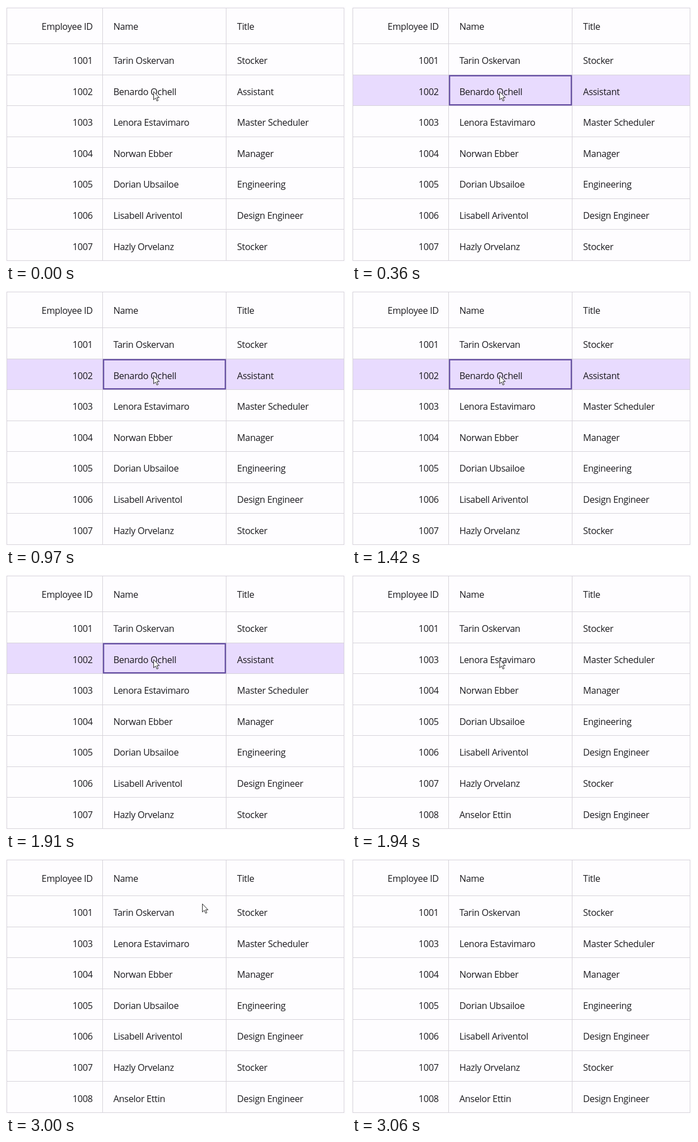
These frames come from a looping animation (600 by 451 pixels, 3730 ms). An HTML page:

```html
<!DOCTYPE html>
<html lang="en">
<head>
<meta charset="utf-8">
<title>Employee table</title>
<style>
  html, body { margin: 0; width: 100%; height: 100%; overflow: hidden; background: #fefdff; }
  svg { display: block; width: 100vw; height: 100vh; }
  text { font: 16.15px "Open Sans", "Noto Sans", sans-serif; letter-spacing: -0.35px; fill: #1c1b1f; }
  .id { text-anchor: end; }
  .grid { fill: #d6d3da; shape-rendering: crispEdges; }
</style>
</head>
<body>
<svg id="stage" viewBox="0 0 600 451">
  <rect id="rowFill" x="1" y="121" width="596" height="55" fill="#e8dbfe"/>
  <g id="grid" class="grid"></g>
  <rect id="cellBorder" x="172.1" y="122.8" width="215" height="51.4" fill="none" stroke="#6750a4" stroke-width="2.4"/>
  <g id="header"></g>
  <g id="before"></g>
  <g id="after"></g>
  <path id="cursor" d="M.6 .8V15.2L3.9 12.1L6.3 17.4L8.5 16.4L6.2 11.3H10.5Z"
        fill="#fff" stroke="#222" stroke-width="1" stroke-linejoin="round"/>
</svg>
<script>
const LOOP = 3730, SELECT_AT = 360, DELETE_AT = 1940;
const COLUMNS = [1, 170, 388, 596];
const LINES = [3, 66, 121, 175, 230, 284, 339, 393, 448];
const TEXT_X = [153, 189.4, 407.8];
const HEADER_Y = 42.4, FIRST_ROW_Y = 102, ROW_PITCH = 54.6;

const people = [
  ['1001', 'Tarin Oskervan', 'Stocker'],
  ['1002', 'Benardo Ochell', 'Assistant'],
  ['1003', 'Lenora Estavimaro', 'Master Scheduler'],
  ['1004', 'Norwan Ebber', 'Manager'],
  ['1005', 'Dorian Ubsailoe', 'Engineering'],
  ['1006', 'Lisabell Ariventol', 'Design Engineer'],
  ['1007', 'Hazly Orvelanz', 'Stocker'],
  ['1008', 'Anselor Ettin', 'Design Engineer']
];

// Pointer steps: start time, x, y; it is gone after the last one.
const pointerSteps = [
  [0, 260, 150],
  [2940, 264, 146],
  [2970, 289, 125],
  [3000, 346, 80],
  [3030, 429, 15]
];
const POINTER_GONE = 3060;

const $ = id => document.getElementById(id);

function add(parent, tag, attrs, text) {
  const node = document.createElementNS('http://www.w3.org/2000/svg', tag);
  for (const key in attrs) node.setAttribute(key, attrs[key]);
  if (text) node.textContent = text;
  parent.append(node);
}

function addRow(parent, cells, y) {
  cells.forEach((cell, i) =>
    add(parent, 'text', { x: TEXT_X[i], y, class: i ? 'cell' : 'id' }, cell));
}

function addRows(parent, rows) {
  rows.forEach((row, i) => addRow(parent, row, Math.round(FIRST_ROW_Y + i * ROW_PITCH)));
}

for (const y of LINES) add($('grid'), 'rect', { x: 1, y, width: 596, height: 1 });
for (const x of COLUMNS) add($('grid'), 'rect', { x, y: 3, width: 1, height: 446 });
addRow($('header'), ['Employee ID', 'Name', 'Title'], HEADER_Y);
addRows($('before'), people.slice(0, 7));
addRows($('after'), people.filter((_, i) => i !== 1));

function show(id, visible) {
  $(id).style.display = visible ? '' : 'none';
}

function draw(t) {
  const selected = t >= SELECT_AT && t < DELETE_AT;
  show('rowFill', selected);
  show('cellBorder', selected);
  show('before', t < DELETE_AT);
  show('after', t >= DELETE_AT);
  show('cursor', t < POINTER_GONE);
  const [, x, y] = pointerSteps.findLast(step => step[0] <= t);
  $('cursor').setAttribute('transform', `translate(${x} ${y})`);
}

const start = performance.now();
function tick() {
  draw((performance.now() - start) % LOOP);
  requestAnimationFrame(tick);
}
tick();
</script>
</body>
</html>
```
